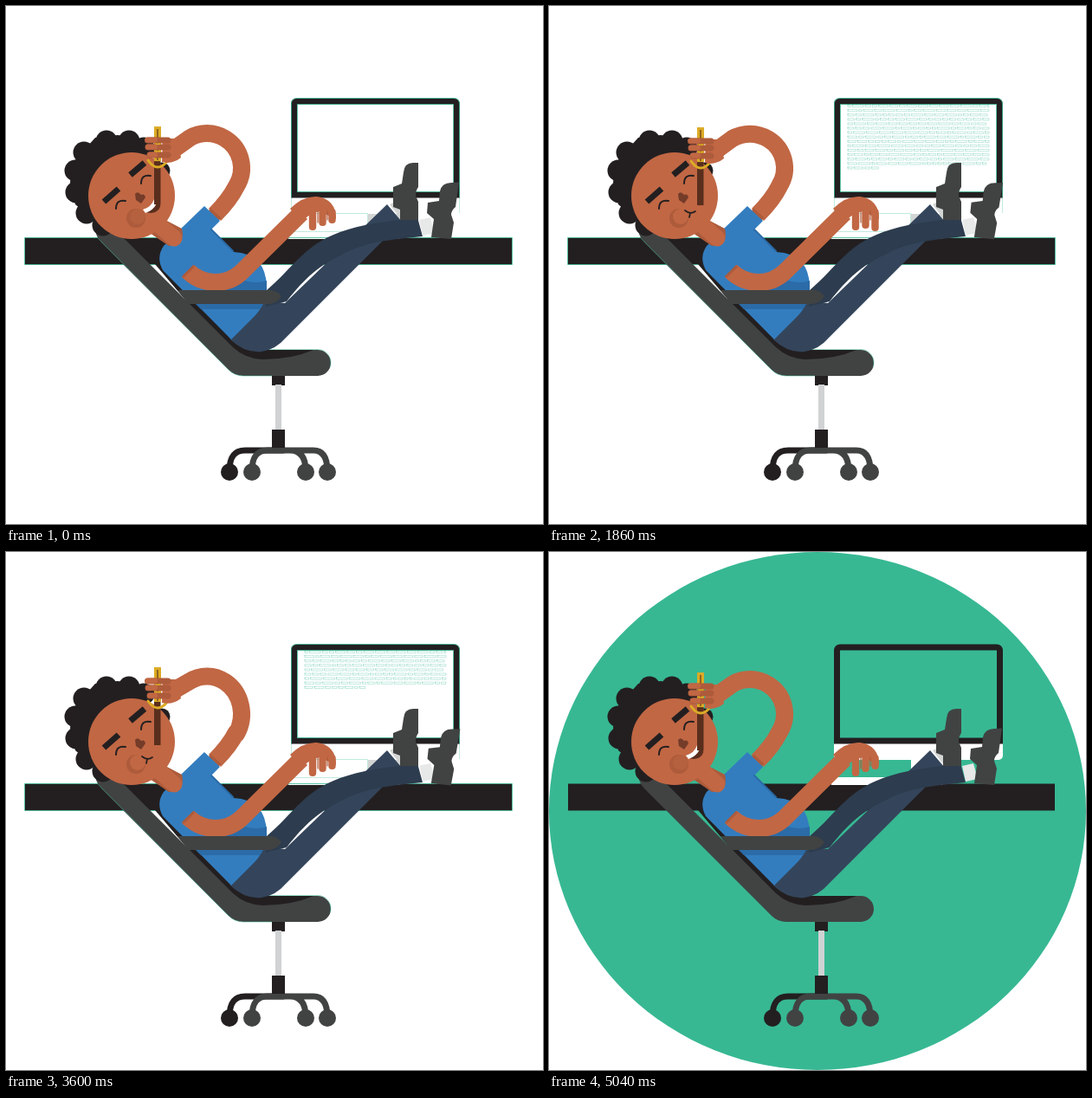
An HTML page with a canvas that plays this animation: 620 by 598 pixels, repeating every 5070 ms.

```html
<!DOCTYPE html>
<html lang="en">
<head>
<meta charset="utf-8">
<title>Lunch break</title>
<style>
html, body { margin: 0; width: 100%; height: 100%; overflow: hidden; background: #fff; }
canvas { display: block; width: 620px; height: 598px; }
</style>
</head>
<body>
<canvas id="stage" width="620" height="598"></canvas>
<script>
const ctx = document.getElementById('stage').getContext('2d');
const LOOP = 5070, STEP = 60, CYCLE = 42;
const GREEN = '#37b893', INK = '#231f20', GREY = '#414343', SKIN = '#c16744',
      SHADE = '#ad5b3b', SHIRT = '#337dbf', FOLD = '#2b6ba7', BROWN = '#592e1d', GOLD = '#dcab26';
const FLASHES = [0, 20, 29, 35];
const paths = {};

function path(d) {
  return paths[d] || (paths[d] = new Path2D(d));
}
function fill(d, color) {
  ctx.fillStyle = color;
  ctx.fill(path(d));
}
function line(d, color, width, cap = 'round') {
  ctx.strokeStyle = color;
  ctx.lineWidth = width;
  ctx.lineCap = cap;
  ctx.lineJoin = 'round';
  ctx.stroke(path(d));
}
function box(x, y, w, h, color, r = 0) {
  ctx.fillStyle = color;
  ctx.beginPath();
  ctx.roundRect(x, y, w, h, r);
  ctx.fill();
}
function dot(x, y, r, color) {
  ctx.fillStyle = color;
  ctx.beginPath();
  ctx.arc(x, y, r, 0, Math.PI * 2);
  ctx.fill();
}
function edge(d, alpha = 1) {
  ctx.globalAlpha = alpha;
  line(d, GREEN, 1, 'butt');
  ctx.globalAlpha = 1;
}

// Rows of short words, as [x, width] pairs
let seed = 7;
function random() {
  seed = (seed * 16807) % 2147483647;
  return seed / 2147483647;
}
const rows = Array.from({ length: 20 }, () => {
  const words = [];
  for (let x = 345; x < 506;) {
    const w = Math.min(3 + random() * 11, 508 - x);
    words.push([x, w]);
    x += w + 2;
  }
  return words;
});

function drawText(phase, green) {
  if (!phase) return;
  const typed = 0.4 + 0.446 * phase;
  rows.forEach((words, i) => {
    const end = 345 + 163 * Math.min(1, typed - i);
    for (const [x, w] of words) {
      if (x >= end) break;
      const width = Math.min(w, end - x), y = 114.5 + i * 5.1;
      if (green) {
        box(x, y, width, 2.5, '#fff', 1);
      } else {
        ctx.strokeStyle = 'rgba(55,184,147,.45)';
        ctx.lineWidth = 0.7;
        ctx.setLineDash([3, 1]);
        ctx.strokeRect(x, y, width, 2.2);
        ctx.setLineDash([]);
      }
    }
  });
}

function drawDesk(phase, green) {
  box(22, 267.5, 562, 31, INK);
  box(325, 260, 130, 9, '#fff', 2);
  box(418, 239, 50, 22, green ? '#fff' : '#d3d5d5');
  box(329, 215, 195, 25, '#fff', 5);
  box(329, 106.5, 195, 115, INK, [7, 7, 0, 0]);
  box(336, 113.5, 181, 101, green ? GREEN : '#fff');
  drawText(phase, green);
  if (green) return;
  edge('M21.5 267.5 H584.5 V298.5 H21.5 Z', 0.8);
  edge('M329.5 221 V112 Q329.5 106.5 336 106.5 H517 Q523.5 106.5 523.5 113 V221', 0.8);
  edge('M336.5 113.5 H516.5 V214.5 H336.5 Z', 0.8);
  edge('M329.5 222 V239.5 H417.5 V260.5 H327 M523.5 222 V239', 0.3);
}

function drawChair(green) {
  line('M258 537 C258 520 264 513 276 513 H320', INK, 7);
  line('M284 537 C284 520 290 513 302 513 H355 C366 513 371 521 371 537 M328 513 C340 513 346 521 346 537', GREY, 7);
  dot(258, 538, 10, INK);
  for (const x of [284, 346, 371]) dot(x, 538, 10, GREY);
  box(307, 426, 15, 12, INK);
  box(311, 437, 7, 53, '#d0d2d3');
  box(307, 489, 15, 21, INK);
  fill('M150 272 L190 290 L262 386 Q280 398 300 397 H358 Q350 410 295 412 Q270 411 256 397 Z', INK);
  fill('M104 251 Q101 264 110 273 L257 420 Q264 427 274 427 H360 A15 15 0 0 0 360 397 H355 Q330 408 296 408 Q276 407 262 394 L130 262 Z', GREY);
  if (!green) edge('M298 396.5 H360 A15 15 0 0 1 374 417 M105 267 L257 420 Q264 427 274 427 H307', 0.5);
}

function drawLegs(phase) {
  const tilt = Math.sin(Math.PI * phase / CYCLE) * 0.025;
  fill('M443 229 L449 226 L467 242 L458 249 Z', '#d3d5d5');
  fill('M322 343 L298 340 L259 385 Q276 401 295 399 Q311 397 323 383 L457 249 L440 229 Z', '#34455b');
  fill('M300 329 C334 300 346 272 395 258 C420 250 450 248 475 244 L481 266 C440 270 414 273 390 286 C362 299 345 314 324 341 L300 347 Z', '#2d3c4e');
  fill('M459 192 Q460 181 470 181 H476 V209 Q473 213 473 219 L476 226 V247 H455 V235 L447 232 V209 L457 205 Z', GREY);
  ctx.save();
  ctx.translate(495, 260);
  ctx.rotate(tilt);
  ctx.translate(-495, -260);
  fill('M477 247 L490 244 L495 262 L481 265 Z', '#e7e8e8');
  fill('M501 214 Q503 204 514 204 L523 203.5 L519 232 Q514 236 514 241 L517 250 L514 269 L491 267 L494 246 L486 239 L487 227 L500 225 Z', GREY);
  ctx.restore();
}

function drawBody() {
  fill('M182 277 L204 255 L229 231 L247 248 L237 258 L263 284 Q300 286 301 324 Q301 345 284 361 L260 385 L181 305 Q173 290 182 277 Z', SHIRT);
  line('M237 258 L262 283', FOLD, 2);
  fill('M232 328 Q258 330 275 317 Q290 321 301 317 V328 Z', FOLD);
  fill('M219 344 H297 L293 350 H225 Z', FOLD);
}

function drawHead(open) {
  const curls = [[80, 190], [81, 215], [93, 239], [90, 169], [116, 156], [142, 156], [159, 164], [112, 253]];
  for (const [x, y] of curls) dot(x, y, 12.5, INK);
  fill('M74 203 L78 180 L103 152 L129 149 L153 153 L160 168 L150 215 L122 262 L104 250 L80 229 Z', INK);
  dot(180, 190, 9.5, INK);
  fill('M166 262 L184 247 L203 257 Q208 276 188 277 Z', SHADE);
  line('M177 253 L194 268', SKIN, 19);
  dot(145, 219, 50, SKIN);
  line('M113 226 L130 211 M143.5 195 L160 181', INK, 7, 'butt');
  line('M127 234 Q127 223 138 225 M156 205 Q156 194 167 196', INK, 2);
  fill('M149 217 Q152 213 156 218 Q160 216 161 221 L156 228 L150 224 Z', '#743c29');
  dot(150, 245, 11, SHADE);
  if (open) {
    dot(152, 243, 9, '#b5603e');
    fill('M159 237 Q171 234 173 223 Q181 228 177 234 Q171 242 159 237 Z', BROWN);
    fill('M158 235 Q168 232 171 223 L174 228 Q170 236 161 239 Z', '#fff');
  } else {
    dot(152, 243, 9, SKIN);
    line('M157 236 Q163 241 169 237 M163 239 L162 244', INK, 1.7);
  }
}

function drawRaisedArm(lift) {
  ctx.strokeStyle = SKIN;
  ctx.lineWidth = 20;
  ctx.lineCap = 'butt';
  ctx.beginPath();
  ctx.moveTo(241, 241);
  ctx.quadraticCurveTo(258, 224, 266, 208);
  ctx.ellipse(232, 187, 40, 40 - lift * 0.6, 0, 0.55, -2.1, true);
  ctx.lineTo(190, 168 + lift);
  ctx.stroke();
  line('M235 235 L247 246', SHADE, 4, 'butt');
}

function drawSnack(lift) {
  ctx.save();
  ctx.translate(0, lift);
  box(171, 178, 7.5, 51, BROWN);
  box(171, 139, 8, 40, GOLD);
  box(174, 142, 2, 36, '#90651f');
  line('M164 178 Q175 194 187 178', GOLD, 3);
  fill('M181 153 H198 L202 175 Q192 183 180 180 Z', SKIN);
  line('M163.5 155 H187 M164 163 H187 M166 172 H187', SHADE, 7);
  line('M163.5 154.5 H172 M164 162.5 H172 M166 171.5 H172', SKIN, 6);
  box(173, 158.5, 5, 1.5, GOLD);
  box(173, 167, 5, 1.5, GOLD);
  ctx.restore();
}

function drawRestingArm(phase) {
  const tap = Math.max(0, Math.sin(Math.PI * 2 * (phase - 20) / CYCLE));
  line('M210 306 C228 323 254 323 271 308 L341 239', SKIN, 20, 'butt');
  line('M204 313 L217 300', SHADE, 3, 'butt');
  fill('M328 234 Q343 219 359 220 Q381 223 381 246 Q370 241 362 237 Q350 239 342 249 Z', SKIN);
  [[354, 259], [365.5, 254 + 3 * tap], [376.5, 251 + 9 * tap]].forEach(([x, y], i) => {
    const top = 230 + i * 2;
    box(x - 4.2, top, 8.4, y - top, SKIN, 4);
  });
  line('M360 237 V250 M371 237 V247', SHADE, 1.2);
}

function draw(step) {
  const phase = step % CYCLE;
  const green = step > 0 && FLASHES.includes(phase);
  const lift = -2.3 + 4.3 * Math.cos(Math.PI * 2 * (phase - 35.5) / CYCLE);
  ctx.fillStyle = '#fff';
  ctx.fillRect(0, 0, 620, 598);
  if (green) {
    ctx.fillStyle = GREEN;
    ctx.beginPath();
    ctx.ellipse(310, 299, 310, 299, 0, 0, Math.PI * 2);
    ctx.fill();
  }
  drawDesk(phase, green);
  drawChair(green);
  drawLegs(phase);
  drawRaisedArm(lift);
  drawBody();
  drawHead(phase < 8 || phase > 35);
  drawSnack(lift);
  drawRestingArm(phase);
  fill('M198 328 H306 Q313 329 318 335 Q313 343 304 344 H211 Z', GREY);
}

const start = performance.now();
function tick() {
  draw(Math.floor(((performance.now() - start) % LOOP) / STEP));
  requestAnimationFrame(tick);
}
tick();
</script>
</body>
</html>
```
